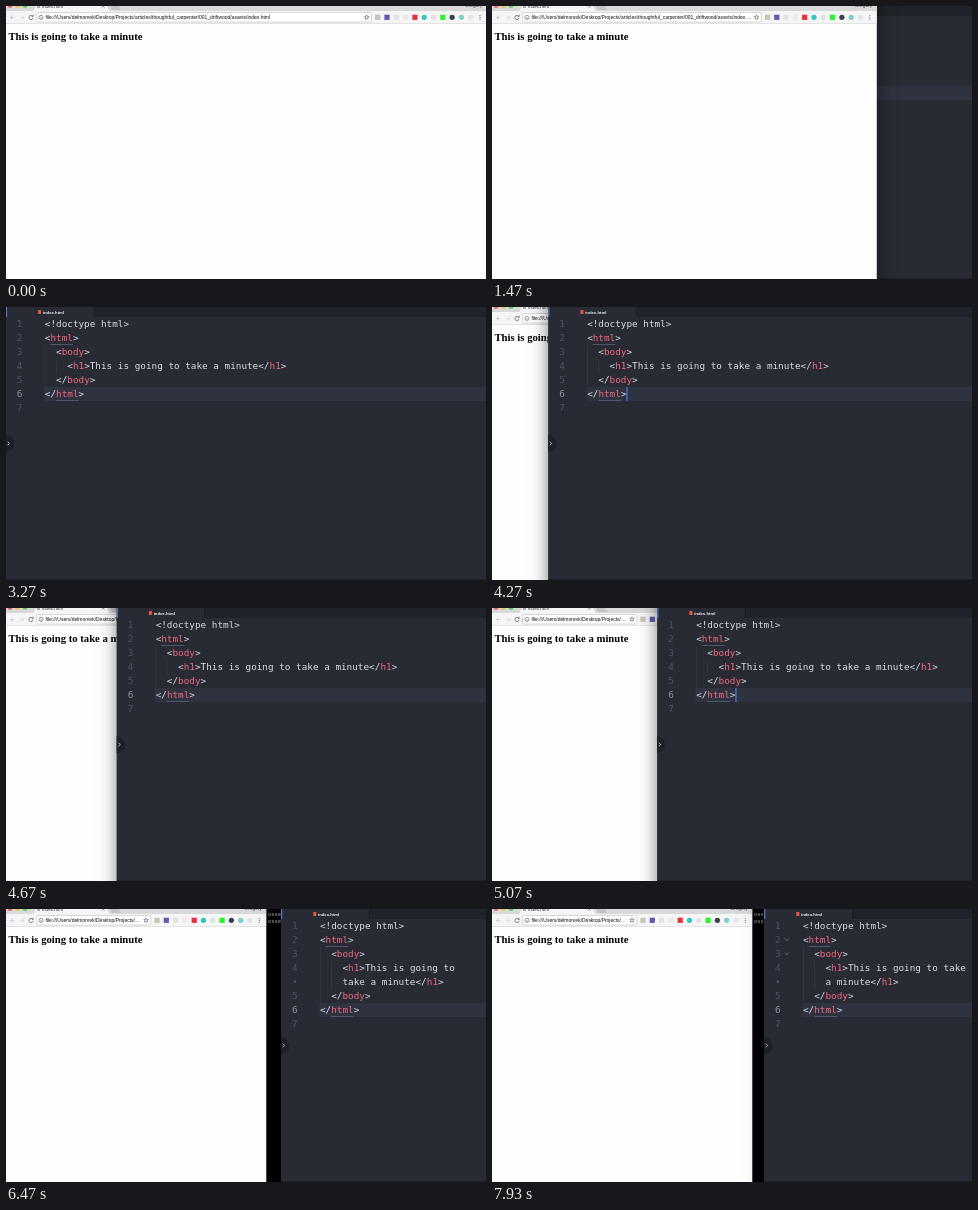
An HTML page with a canvas for the animation above (8000 ms loop, 480 px wide and 273 px high).

```html
<!DOCTYPE html>
<html lang="en">
<head>
<meta charset="utf-8">
<title>Window resizing</title>
<style>
  html, body { margin: 0; width: 100%; height: 100%; overflow: hidden; background: #000; }
  canvas { display: block; width: 480px; height: 273px; }
</style>
</head>
<body>
<canvas></canvas>
<script>
const WIDTH = 480, HEIGHT = 273, LOOP = 8000;
const SANS = '"Liberation Sans", Arial, sans-serif';
const SERIF = '"Liberation Serif", Times, serif';
const MONO = '"DejaVu Sans Mono", Menlo, monospace';

const URL_TEXT = 'file:///Users/delmorevk/Desktop/Projects/articles/thoughtful_carpenter/001_driftwood/assets/index.html';
const SOURCE = [
  '<!doctype html>',
  '<html>',
  '  <body>',
  '    <h1>This is going to take a minute</h1>',
  '  </body>',
  '</html>',
  ''
];
const CHAR = 5.62, ROW = 14, TEXT_X = 39, WRAP_X = 475;
const EXTENSIONS = ['#c9c4ba', '#6258ae', '#e4e4e8', '#eeeaea', '#e5323c', '#35c4bf',
                    '#dfe2e2', '#2df02f', '#35424c', '#7fd0cc', '#e3e6e6'];
const ROUND = new Set([5, 6, 8, 9, 10]);

// Time (ms) and position (px) of the two dragged window edges
const BROWSER_RIGHT = [[930, 480], [1200, 442], [1470, 384], [1700, 334], [2050, 259.3]];
const EDITOR_LEFT = [[3750, -0.2], [3950, 15], [4270, 56], [5070, 165], [5700, 250],
                     [6200, 273], [6470, 275], [7300, 275], [7700, 272]];
const EDITOR_FRONT = 2330, GUTTER_HOVER = 7330;

const canvas = document.querySelector('canvas');
const ctx = canvas.getContext('2d');
const scale = window.devicePixelRatio || 1;
canvas.width = WIDTH * scale;
canvas.height = HEIGHT * scale;

function track(keys, t) {
  if (t <= keys[0][0]) return keys[0][1];
  for (let i = 1; i < keys.length; i++) {
    const [t0, a] = keys[i - 1], [t1, b] = keys[i];
    if (t < t1) return a + (b - a) * (t - t0) / (t1 - t0);
  }
  return keys[keys.length - 1][1];
}

function rect(x, y, w, h, color) {
  ctx.fillStyle = color;
  ctx.fillRect(x, y, w, h);
}

function dot(x, y, r, color) {
  ctx.fillStyle = color;
  ctx.beginPath();
  ctx.arc(x, y, r, 0, Math.PI * 2);
  ctx.fill();
}

function line(points, color, width = 0.8) {
  ctx.strokeStyle = color;
  ctx.lineWidth = width;
  ctx.beginPath();
  points.forEach(([x, y]) => ctx.lineTo(x, y));
  ctx.stroke();
}

function polygon(points, color) {
  ctx.fillStyle = color;
  ctx.beginPath();
  points.forEach(([x, y]) => ctx.lineTo(x, y));
  ctx.fill();
}

function text(string, x, y, font, color) {
  ctx.font = font;
  ctx.fillStyle = color;
  ctx.fillText(string, x, y);
}

function windowRect(x, right, color) {
  ctx.save();
  ctx.shadowColor = 'rgba(0,0,0,.5)';
  ctx.shadowBlur = 16 * scale;
  rect(x, -20, right - x, HEIGHT + 40, color);
  ctx.restore();
}

function elide(string, maxWidth, font) {
  ctx.font = font;
  if (ctx.measureText(string).width <= maxWidth) return string;
  let n = string.length;
  while (n && ctx.measureText(string.slice(0, n) + '…').width > maxWidth) n--;
  return string.slice(0, n) + '…';
}

function drawTerminal() {
  rect(0, 0, WIDTH, HEIGHT, '#000');
  for (const y of [6.5, 14]) text('osse', 262, y, `5.4px ${MONO}`, '#d0d0d0');
}

function drawArrow(x, direction, color) {
  line([[x - 2, 11.5], [x + 2, 11.5]], color);
  line([[x, 9.5], [x + 2 * direction, 11.5], [x, 13.5]], color);
}

function drawStar(x, y) {
  const points = Array.from({ length: 11 }, (_, i) => {
    const angle = i * Math.PI / 5 - Math.PI / 2, r = i % 2 ? 1.1 : 2.4;
    return [x + r * Math.cos(angle), y + r * Math.sin(angle)];
  });
  line(points, '#555', 0.6);
}

function drawBrowser(right) {
  const edge = right + 1;
  windowRect(-20, edge, '#fefefe');
  ctx.save();
  ctx.beginPath();
  ctx.rect(0, 0, edge, HEIGHT);
  ctx.clip();

  rect(0, 0, edge, 5, '#d9d9da');
  rect(0, 5, edge, 12, '#f5f5f5');
  rect(0, 17, edge, 0.7, '#d8d8d8');
  ['#ee6a62', '#efbf58', '#62c968'].forEach((color, i) => dot(4 + i * 7.5, -0.5, 2.5, color));
  polygon([[27, 5.5], [30, 0], [101, 0], [104, 5.5]], '#f5f5f5');
  polygon([[104, 0], [113, 0], [115, 4], [106, 4]], '#c4c4c5');
  rect(31, -2, 3, 4, '#aaa');
  text('index.html', 36, 2, `4.6px ${SANS}`, '#333');
  line([[96, -1], [98.5, 1.7]], '#666', 0.6);
  line([[98.5, -1], [96, 1.7]], '#666', 0.6);
  text('Gregory', right - 21, 1.3, `4.8px ${SANS}`, '#444');

  drawArrow(6.5, -1, '#c8c8c8');
  drawArrow(16, 1, '#d8d8d8');
  ctx.beginPath();
  ctx.arc(25, 11.5, 2.1, 0.2, 5.5);
  ctx.strokeStyle = '#666';
  ctx.lineWidth = 0.8;
  ctx.stroke();
  polygon([[25.3, 10.7], [27.5, 10.7], [27.5, 8.6]], '#666');

  ctx.beginPath();
  ctx.roundRect(30.5, 6.5, right - 145, 9.5, 1.3);
  ctx.fillStyle = '#fff';
  ctx.fill();
  ctx.strokeStyle = '#cfcfcf';
  ctx.lineWidth = 0.8;
  ctx.stroke();
  ctx.beginPath();
  ctx.arc(35, 11.4, 2.1, 0, Math.PI * 2);
  ctx.strokeStyle = '#555';
  ctx.lineWidth = 0.6;
  ctx.stroke();
  line([[35, 11], [35, 12.7]], '#555', 0.6);
  const urlFont = `4.98px ${SANS}`;
  // The full address fits a little wider than an elided one
  const room = right - (right >= 479 ? 110 : 124) - 39.5;
  text(elide(URL_TEXT, room, urlFont), 39.5, 13.1, urlFont, '#111');
  drawStar(right - 119.3, 11.3);

  EXTENSIONS.forEach((color, i) => {
    const x = right - 108.3 + i * 9.3;
    if (ROUND.has(i)) dot(x, 11.3, 2.6, color);
    else rect(x - 2.6, 8.7, 5.2, 5.2, color);
  });
  for (const y of [9.5, 11.4, 13.3]) dot(right - 6, y, 0.55, '#666');

  text('This is going to take a minute', 2.5, 34, `bold 10.68px ${SERIF}`, '#000');
  ctx.restore();
}

// Soft wrap at spaces; continuation rows keep the indent
function layoutRows(left) {
  const columns = Math.floor((WRAP_X - left - TEXT_X) / CHAR);
  const rows = [];
  SOURCE.forEach((source, index) => {
    const indent = source.match(/^ */)[0];
    let current = '', label = String(index + 1);
    for (const word of source.trim().split(' ')) {
      const next = current ? current + ' ' + word : indent + word;
      if (current && next.length > columns) {
        rows.push({ label, index, code: current });
        label = '•';
        current = indent + word;
      } else {
        current = next;
      }
    }
    rows.push({ label, index, code: current });
  });
  return rows;
}

function drawCode(code, x, y) {
  let column = 0;
  code.split(/(?<=<\/?)(\w+)(?=>)/).forEach((part, i) => {
    const isTag = i % 2 === 1, partX = x + column * CHAR;
    if (isTag && part === 'html') rect(partX, y + 13, part.length * CHAR, 0.8, '#5a6278');
    text(part, partX, y + 10.3, `9.33px ${MONO}`, isTag ? '#f3687e' : '#dadee6');
    column += part.length;
  });
}

function drawEditor(left, t) {
  const front = t >= EDITOR_FRONT;
  windowRect(left, WIDTH + 20, '#282b33');
  ctx.save();
  ctx.beginPath();
  ctx.rect(left, 0, WIDTH - left, HEIGHT);
  ctx.clip();

  rect(left + 88, 0, WIDTH, 10, '#20232a');
  rect(left + 88, 0, 0.7, 10, '#181a1f');
  rect(left, 0, 1.3, 10, '#5674c8');
  rect(left + 32.3, 3, 3, 4, '#e4573d');
  text('index.html', left + 37, 6.5, `bold 4.25px ${SANS}`, '#f0f2f5');

  const textX = left + TEXT_X;
  layoutRows(left).forEach(({ label, index, code }, i) => {
    const y = 10 + i * ROW, active = index === 5;
    if (active) rect(textX - 1, y, WIDTH, ROW, '#2f333f');
    const indent = code.search(/\S|$/);
    for (let c = 0; c < indent; c += 2) rect(textX + c * CHAR, y, 0.6, ROW, '#383d47');
    text(label, left + 11, y + 10.3, `9.33px ${MONO}`, active ? '#8f95a1' : '#4d5462');
    drawCode(code, textX, y);
    if (t >= GUTTER_HOVER && (index === 1 || index === 2)) {
      line([[left + 21, y + 5.5], [left + 23, y + 7.7], [left + 25, y + 5.5]], '#737a88');
    }
    const caretOn = (t - 4130 + LOOP) % 800 < 400;
    if (active && front && caretOn) rect(textX + code.length * CHAR, y, 1, ROW, '#528bff');
  });

  dot(left, 136.5, 8.5, '#1d2026');
  line([[left + 1.8, 134.7], [left + 3.6, 136.5], [left + 1.8, 138.3]], '#c5c9d2', 0.9);
  rect(left, 272, WIDTH, 1, '#211f28');
  ctx.restore();
}

function draw(now) {
  const t = now % LOOP;
  const right = track(BROWSER_RIGHT, t), left = track(EDITOR_LEFT, t);
  ctx.setTransform(scale, 0, 0, scale, 0, 0);
  drawTerminal();
  if (t < EDITOR_FRONT) {
    drawEditor(left, t);
    drawBrowser(right);
  } else {
    drawBrowser(right);
    drawEditor(left, t);
  }
}

function tick() {
  draw(performance.now());
  requestAnimationFrame(tick);
}
tick();
</script>
</body>
</html>
```
